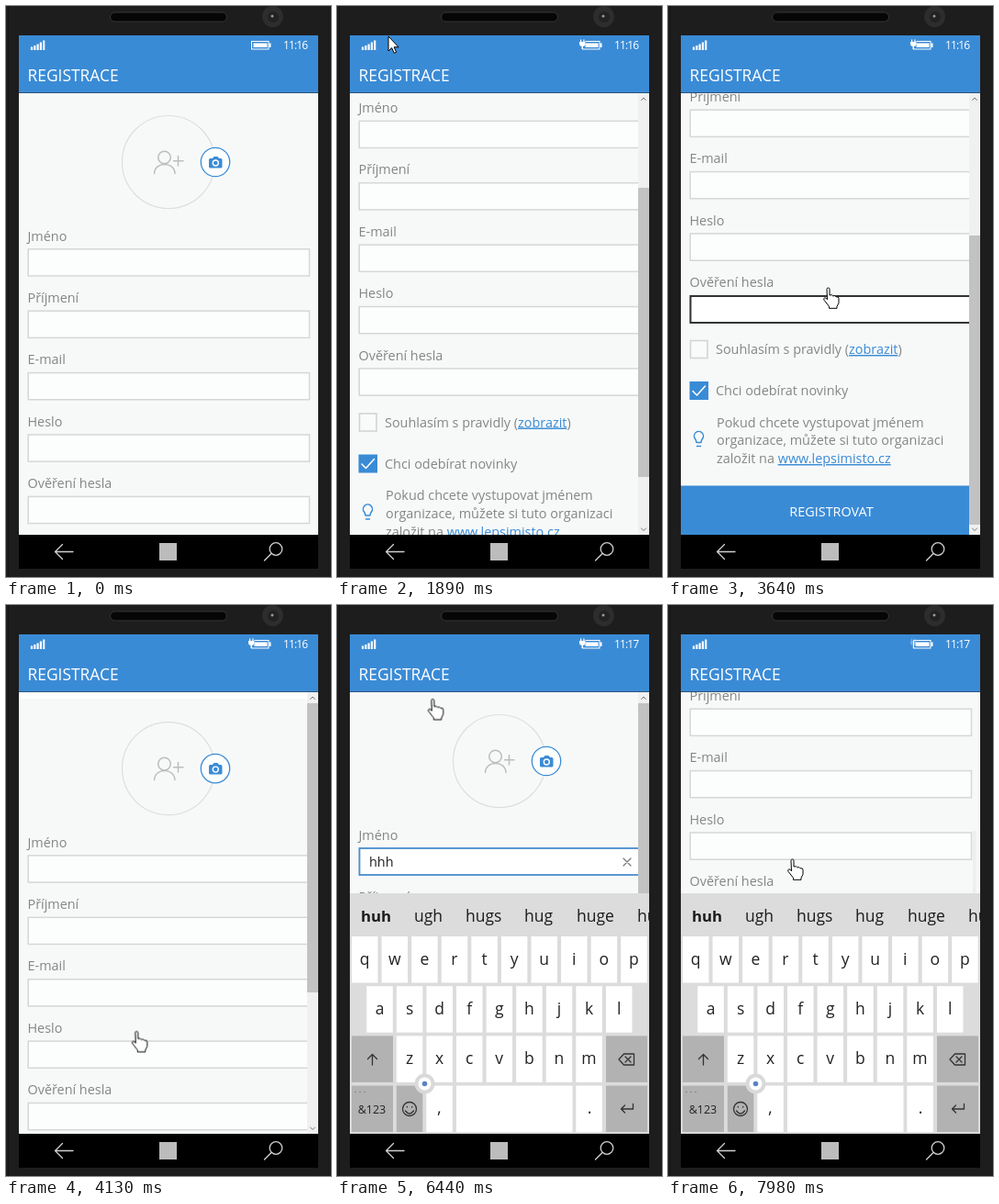
An HTML page for the animation above (8000 ms loop, 354 px wide and 622 px high).

```html
<!DOCTYPE html>
<html lang="cs">
<head>
<meta charset="utf-8">
<title>Registrace</title>
<style>
@property --s { syntax: '<number>'; inherits: true; initial-value: 0; }
@property --k { syntax: '<number>'; inherits: true; initial-value: 263; }

html, body { margin: 0; width: 100%; height: 100%; overflow: hidden; background: #1d1d1d; }
svg { display: block; width: 354px; height: 622px; font: 14.4px "Open Sans", "Noto Sans", sans-serif; }
text { white-space: pre; }
.gray { fill: #858585; }
.link { fill: #3a8bd6; text-decoration: underline; }
.blue { fill: #3a8bd6; }
.line { fill: none; stroke-linecap: round; stroke-linejoin: round; }
.field { fill: #fcfdfd; stroke: #d6d7d7; stroke-width: 1.5; }
.mid { text-anchor: middle; }

/* linear motion */
.view { animation: scroll 8s linear infinite, rise 8s linear infinite; }
.page { transform: translateY(calc(var(--s) * -1px)); }
.thumb { transform: translateY(calc(clamp(0, var(--s), 219) * .653px)); }
.keys { transform: translateY(calc(var(--k) * 1px)); }
.panel { transform: translateY(calc(var(--k) * 1.23px)); }
.bar { animation: bar 8s linear infinite; }
.slim { animation: slim 8s linear infinite; }
.cursor { animation: move 8s linear infinite; }

/* hard switches */
.arrow { animation: arrow 8s step-end infinite; }
.hand { animation: hand 8s step-end infinite; }
.plug { animation: plug 8s step-end infinite; }
.press { animation: press 8s step-end infinite; }
.focus { animation: focus 8s step-end infinite; }
.caret { animation: caret 8s step-end infinite; }
.before { animation: before 8s step-end infinite; }
.h1 { animation: h1 8s step-end infinite; }
.h2 { animation: h2 8s step-end infinite; }
.h3 { animation: h3 8s step-end infinite; }

@keyframes scroll {
  0%, 20.125% { --s: 0; }
  23.625% { --s: 139; }
  25.375% { --s: 205; }
  26.875% { --s: 236; }
  28% { --s: 232; }
  29.75%, 30.625% { --s: 219; }
  34.125% { --s: 246; }
  35.9% { --s: 242; }
  38.5%, 46.375% { --s: 219; }
  50.75% { --s: 0; }
  52.5% { --s: -16; }
  56%, 86.625% { --s: 0; }
  91% { --s: 190; }
  92.75% { --s: 226; }
  96.25%, 100% { --s: 219; }
}
@keyframes rise {
  0%, 57.75% { --k: 263; }
  58.625% { --k: 200; }
  59.5% { --k: 93; }
  60.375% { --k: 43; }
  61.25% { --k: 20; }
  62.125%, 100% { --k: 0; }
}
@keyframes move {
  0%, 2.625% { transform: translate(100px, 615px); }
  7% { transform: translate(90px, 420px); }
  12.25% { transform: translate(48px, 300px); }
  18.375% { transform: translate(60px, 230px); }
  20.125% { transform: translate(60px, 190px); }
  23.625%, 24% { transform: translate(56px, 33px); }
  25.375% { transform: translate(80px, 94px); }
  28%, 30.625% { transform: translate(141px, 294px); }
  34.125% { transform: translate(150px, 262px); }
  38.5%, 41.125% { transform: translate(160px, 320px); }
  45.5%, 46.375% { transform: translate(175px, 307px); }
  50.75% { transform: translate(150px, 500px); }
  56% { transform: translate(107px, 290px); }
  58.625%, 76.125% { transform: translate(107px, 274px); }
  80.5% { transform: translate(105px, 103px); }
  82.25% { transform: translate(62px, 40px); }
  85.75%, 86.625% { transform: translate(105px, 280px); }
  90.125% { transform: translate(112px, 80px); }
  91% { transform: translate(50px, 14px); }
  92.75% { transform: translate(50px, 4px); }
  96.25% { transform: translate(136px, 200px); }
  99.75%, 100% { transform: translate(136px, 277px); }
}
@keyframes bar {
  0%, 13.125% { opacity: 0; }
  14.5%, 82.5% { opacity: 1; }
  85.75%, 100% { opacity: 0; }
}
@keyframes slim {
  0%, 86.625% { opacity: 0; }
  88%, 96.25% { opacity: .8; }
  99.75%, 100% { opacity: .15; }
}
@keyframes arrow {
  0%, 3.5%, 25.4%, 83.05%, 94.4% { visibility: hidden; }
  2.625%, 22.24%, 80.7%, 90.1% { visibility: visible; }
}
@keyframes hand {
  0%, 22.24%, 80.7%, 90.1% { visibility: hidden; }
  3.5%, 25.4%, 83.05%, 94.4% { visibility: visible; }
}
@keyframes plug {
  0%, 25.375% { opacity: 0; }
  7%, 42.875% { opacity: 1; }
  91.875%, 100% { opacity: .3; }
}
@keyframes press {
  0%, 47% { visibility: hidden; }
  43.75% { visibility: visible; }
}
@keyframes focus {
  0% { visibility: hidden; }
  58.625%, 100% { visibility: visible; }
}
@keyframes caret {
  0% { visibility: hidden; }
  58.625% { visibility: visible; transform: none; }
  64.75% { visibility: visible; transform: translateX(9px); }
  68.25% { visibility: visible; transform: translateX(18px); }
  70.875% { visibility: visible; transform: translateX(27px); }
  74.375%, 100% { visibility: hidden; }
}
@keyframes before { 0% { visibility: visible; } 64.75%, 100% { visibility: hidden; } }
@keyframes h1 { 0% { visibility: hidden; } 64.75%, 100% { visibility: visible; } }
@keyframes h2 { 0% { visibility: hidden; } 68.25%, 100% { visibility: visible; } }
@keyframes h3 { 0% { visibility: hidden; } 70.875%, 100% { visibility: visible; } }
</style>
</head>
<body>
<svg viewBox="0 0 354 622">
  <defs>
    <clipPath id="clip"><path d="M14 95H340V576H14z"/></clipPath>
  </defs>

  <!-- phone body -->
  <rect width="354" height="622" fill="#1d1d1d"/>
  <path d="M2.5 0V622" stroke="#141414"/>
  <rect x="113.500" y="7" width="127" height="10" rx="5" fill="#060606" stroke="#353535"/>
  <circle cx="290.500" cy="11.500" r="11.500" fill="#2d2d2d"/>
  <circle cx="291" cy="12" r="6" fill="#222"/>
  <circle cx="290" cy="11" r="1.500" fill="#999"/>

  <g class="view" clip-path="url(#clip)">
    <rect x="14" y="95" width="326" height="481" fill="#fefefe"/>
    <g class="page">
      <rect x="14" y="94" width="326" height="702" fill="#f7f9f9"/>
      <circle cx="177" cy="170" r="50.500" fill="none" stroke="#dcdfdf" stroke-width="1.200"/>
      <g class="line" stroke="#bcbebe" stroke-width="1.500">
        <circle cx="172.500" cy="165" r="6.800"/>
        <path d="M161.500 182.500C162 169 183.500 169 184 182.500M187.500 163.500V174M182.500 168.700H193"/>
      </g>
      <circle cx="228" cy="170" r="15.700" fill="#fdfefe" stroke="#3a8bd6" stroke-width="1.300"/>
      <path class="blue" d="M222.500 166H225L226.500 164H230.500L232 166H234Q235.500 166 235.500 167.500V175Q235.500 176.500 234 176.500H222.500Q221 176.500 221 175V167.500Q221 166 222.500 166z"/>
      <circle cx="228.300" cy="171" r="3" fill="none" stroke="#fff" stroke-width="1.400"/>

      <g id="fields"></g>
      <rect class="press" x="24.500" y="535" width="306" height="29" fill="#fff" stroke="#333" stroke-width="2"/>
      <g class="focus">
        <rect x="24.500" y="265" width="306" height="29" fill="#fff" stroke="#4a90d0" stroke-width="1.800"/>
        <path class="caret" d="M36 269V289" stroke="#333" stroke-width="1.600"/>
      </g>
      <text x="35" y="285" fill="#222"><tspan class="h1">h</tspan><tspan class="h2">h</tspan><tspan class="h3">h</tspan></text>
      <path class="h1 line" d="M312 276L320 284M320 276L312 284" stroke="#777" stroke-width="1.200"/>

      <rect x="24.500" y="583.500" width="18.500" height="19" fill="#f9fafa" stroke="#d3d5d5" stroke-width="1.600"/>
      <text class="gray" x="52" y="598">Souhlasím s pravidly (<tspan class="link">zobrazit</tspan>)</text>
      <rect class="blue" x="23.500" y="628" width="20.500" height="20"/>
      <path class="line" d="M27 638.500L31.500 643L40.500 633" stroke="#fff" stroke-width="1.500"/>
      <text class="gray" x="52" y="643">Chci odebírat novinky</text>
      <g class="line" stroke="#3a8bd6" stroke-width="1.500">
        <path d="M31 694.500Q31 692.500 29.500 690.500A5 5 0 1 1 37.500 690.500Q36 692.500 36 694.500zM31.500 698.500H35.500"/>
      </g>
      <g class="gray">
        <text x="53" y="677.500">Pokud chcete vystupovat jménem</text>
        <text x="53" y="697">organizace, můžete si tuto organizaci</text>
        <text x="53" y="717">založit na <tspan class="link">www.lepsimisto.cz</tspan></text>
      </g>
      <rect class="blue" x="14" y="741.500" width="326" height="54.500"/>
      <text class="mid" x="178" y="775" fill="#fff">REGISTROVAT</text>
    </g>

    <g class="bar">
      <rect x="328" y="95" width="12" height="482" fill="#f0f0f0"/>
      <rect class="thumb" x="328" y="107" width="12" height="315" fill="#c2c2c2"/>
      <path class="line" d="M331.500 102.500L334 100L336.500 102.500M331.500 569L334 571.500L336.500 569" stroke="#777"/>
    </g>
    <g class="slim"><rect class="thumb" x="332" y="103" width="3.500" height="315" fill="#bbb"/></g>

    <!-- keyboard -->
    <rect class="focus" x="14" y="314" width="326" height="263" fill="#fff"/>
    <rect class="panel" x="14" y="314" width="326" height="270" fill="#dcdcdc"/>
    <g class="h2" font-size="17.500" fill="#1c1c1c">
      <text x="26" y="344.500" font-weight="700" font-size="16.800">huh</text>
      <text x="84" y="344.500">ugh</text>
      <text x="140" y="344.500">hugs</text>
      <text x="204" y="344.500">hug</text>
      <text x="261" y="344.500">huge</text>
      <text x="327" y="344.500">hug</text>
    </g>
    <g class="keys">
      <g id="caps"></g>
      <g class="mid" font-size="17.500" fill="#222">
        <g class="before" id="upper"></g>
        <g class="h1" id="lower"></g>
        <text x="111.500" y="554">,</text>
        <text x="275" y="554">.</text>
        <text x="38" y="554" font-size="12.500">&amp;123</text>
      </g>
      <g class="line" stroke="#333" stroke-width="1.300">
        <path d="M38.500 501V489.500M33.500 494.500L38.500 489.500L43.500 494.500"/>
        <path d="M307 495L312.500 489H323.500V501H312.500zM314 492L320 498M320 492L314 498"/>
        <path d="M322.500 543.500V549H309.500M313.500 545L309.500 549L313.500 553"/>
        <circle cx="79" cy="549" r="7.500"/>
        <path d="M74.500 551Q79 557 83.500 551M76.300 546.500V547M81.700 546.500V547"/>
        <path d="M20 530.500H20.100M25 530.500H25.100M30 530.500H30.100" stroke="#777"/>
      </g>
      <circle cx="95.500" cy="521.500" r="11" fill="#d9d9d9"/>
      <circle cx="95.500" cy="521.500" r="7" fill="#fff"/>
      <circle class="before" cx="95.500" cy="521.500" r="2.800" fill="#505468"/>
      <circle class="h1" cx="95.500" cy="521.500" r="2.800" fill="#5b82c4"/>
    </g>
  </g>

  <!-- header -->
  <rect class="blue" x="14" y="32" width="326" height="62.500"/>
  <path d="M28 48V44.500M31.300 48V43M34.600 48V41.500M37.900 48V39.500M41.200 48V37.500" stroke="#fff" stroke-width="2.200"/>
  <rect x="267.500" y="38.500" width="18.500" height="8.500" fill="none" stroke="#fff"/>
  <path d="M269.500 40.500H284.500V45H269.500zM286.500 40.500H288.500V45H286.500z" fill="#fff"/>
  <g class="plug">
    <rect x="264" y="36" width="6.500" height="10" class="blue"/>
    <path d="M264 39H270.500V41.500Q270.500 43.500 268 44V47H266.500V44Q264 43.500 264 41.500zM265 36.500H266.200V39H265zM268.300 36.500H269.500V39H268.300z" fill="#fff"/>
  </g>
  <g fill="#fff" font-size="12" letter-spacing="-.9">
    <text class="before" x="302" y="47.300">11:16</text>
    <text class="h1" x="302" y="47.300">11:17</text>
  </g>
  <text x="23.500" y="81.500" font-size="17.400" fill="#fff">REGISTRACE</text>

  <!-- navigation bar -->
  <rect x="14" y="576" width="326" height="37" fill="#000"/>
  <g class="line" stroke="#d0d0d0" stroke-width="1.300">
    <path d="M73 594.500H53.500M61.500 586.500L53.500 594.500L61.500 602.500"/>
    <circle cx="294" cy="591.500" r="6.800"/>
    <path d="M289 596.500L281.500 604"/>
  </g>
  <rect x="167" y="585" width="19" height="19" fill="#bcbcbc"/>

  <g class="cursor" fill="#fff" stroke="#000" stroke-linejoin="round">
    <path class="arrow" d="M0 0v16l3.700-3.400 2.500 5.700 2.400-1-2.500-5.500h5z"/>
    <path class="hand" d="M-2 1.500q0-1.500 1.500-1.500t1.500 1.500V8q3-1 3.500.8 3-.8 3.500 1 3-.5 3 1.500v5l-2 4v2h-8.500v-2l-5.500-7q-1-2 .8-2.500 1.500 0 2.700 2z"/>
  </g>
</svg>

<script>
const add = (id, markup) => document.getElementById(id).insertAdjacentHTML('beforeend', markup);

['Jméno', 'Příjmení', 'E-mail', 'Heslo', 'Ověření hesla'].forEach((label, i) => {
  const y = 67.4 * i;
  add('fields', `<text class="gray" x="23.5" y="${255.5 + y}">${label}</text>
    <rect class="field" x="24.2" y="${264.8 + y}" width="306.3" height="29.2"/>`);
});

const cap = (x, y, w, fill = '#fff') =>
  add('caps', `<rect x="${x}" y="${y}" width="${w}" height="50.500" fill="${fill}"/>`);

const pitch = 32.58;
[['qwertyuiop', 30.2], ['asdfghjkl', 46.5], ['zxcvbnm', 79]].forEach(([row, x0], r) => {
  const y = 361 + 54.2 * r;
  [...row].forEach((ch, i) => {
    const x = x0 + pitch * i;
    const glyph = c => `<text x="${x}" y="${y + 31}">${c}</text>`;
    cap(x - 14.2, y, 28.5);
    add('lower', glyph(ch));
    add('upper', glyph(ch.toUpperCase()));
  });
});

const dark = '#b2b2b2';
cap(16, 469.4, 45, dark);
cap(293, 469.4, 45, dark);
cap(16, 523.6, 45, dark);
cap(64.800, 523.6, 28.5, dark);
cap(97.300, 523.6, 28.5);
cap(130, 523.6, 126.5);
cap(260.300, 523.6, 28.5);
cap(293, 523.6, 45, dark);
</script>
</body>
</html>
```
